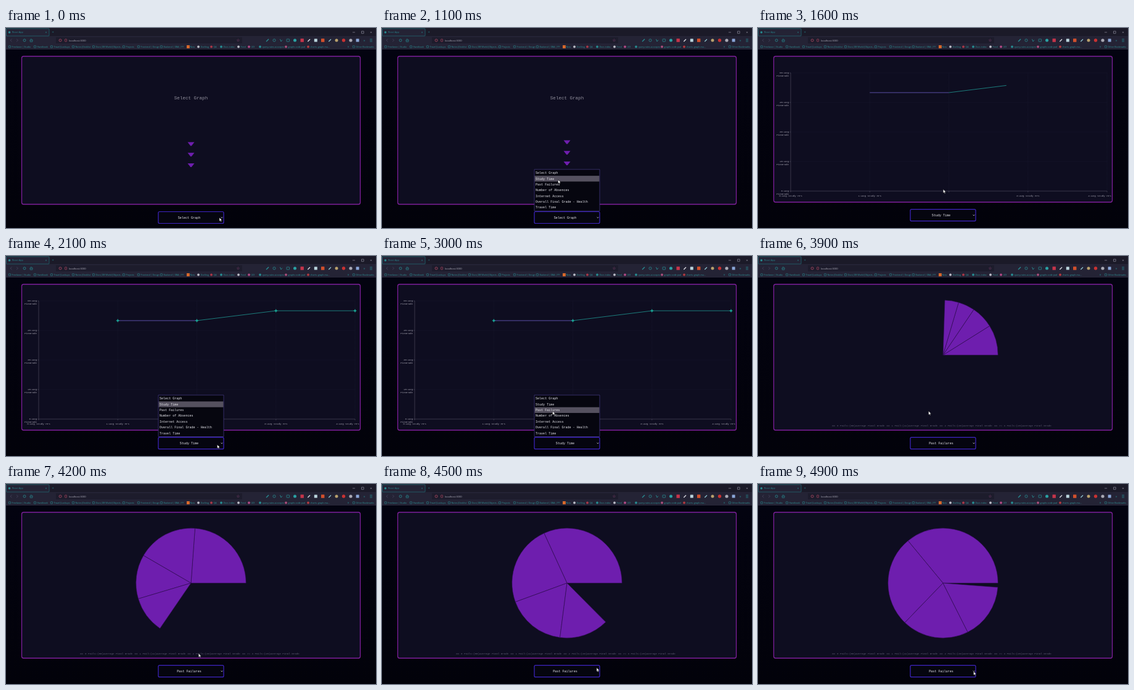
Write an HTML page with a canvas that moves like this. It is 600 px wide and 325 px high and loops after 5 s.

```html
<!DOCTYPE html>
<html lang="en">
<head>
<meta charset="utf-8">
<title>Graph selector</title>
<style>
html, body { margin: 0; width: 100%; height: 100%; overflow: hidden; background: #030310; }
canvas { display: block; width: 600px; height: 325px; }
</style>
</head>
<body>
<canvas id="stage" width="600" height="325"></canvas>
<script>
const ctx = document.getElementById('stage').getContext('2d');
const LOOP = 5000, STEP = 100;
const MONO = '"Liberation Mono", monospace', SANS = '"Open Sans", sans-serif';
const TEAL = '#27898f', PURPLE = '#6e1eae';
const OPTIONS = ['Select Graph', 'Study Time', 'Past Failures', 'Number of Absences',
  'Internet Access', 'Overall Final Grade - Health', 'Travel Time'];
const FAILS = [['0 Fails', 55], ['1 Fail', 41], ['2 Fails', 30], ['>= 3 Fails', 25]];
const GRADES = [[1, 50], [2, 50], [3, 55], [4, 55]];
// time, x, y of the pointer tip
const POINTER = [[0, 346, 308], [600, 346, 308], [1100, 285.5, 246.5], [1400, 285.5, 246.5],
  [2000, 342.5, 306.5], [2300, 342.5, 306.5], [2900, 276.5, 252], [4000, 276.5, 252],
  [4400, 348, 298.5], [4500, 348, 298.5], [4800, 349.5, 304.5], [5000, 349.5, 304.5]];
// x, icon colour (none = folder), label
const BOOKMARKS = [[4, '', 'Freelance | Studio'], [45, '', 'Handbook'], [72, '', 'Travel|Lookups'],
  [107, '', 'Notes|Decklist'], [140, '', 'Docs|DB World|Objects...'], [189, '', 'Projects'],
  [213, '', 'Frontend | Design'], [250, '', 'Backend | DBA | PF'], [293, '#d9692b', 'New'],
  [310, '#b9bcc6', 'Drafting'], [331, '#a83848', 'QA'], [347, TEAL, 'Docs index'],
  [375, '#b9bcc6', 'Feed'], [392, '#b04a86', 'UIX'], [410, TEAL, 'query-rates-ai-scopes'],
  [452, '#a8507c', 'graphs code pad'], [488, '#b03a40', 'charts: graph-mu...'],
  [562, '', 'Other Bookmarks']];

const clamp = v => Math.max(0, Math.min(1, v));
const smooth = v => v * v * (3 - 2 * v);
const mix = (a, b, k) => a + (b - a) * k;

// cubic-bezier(.25, .1, .25, 1)
function ease(x) {
  let lo = 0, hi = 1;
  const curve = (a, b, u) => 3 * (1 - u) ** 2 * u * a + 3 * (1 - u) * u * u * b + u ** 3;
  for (let i = 0; i < 24; i++) {
    const mid = (lo + hi) / 2;
    if (curve(.25, .25, mid) < x) lo = mid; else hi = mid;
  }
  return curve(.1, 1, lo);
}

function text(str, x, y, size, color, align = 'left', family = MONO) {
  ctx.font = `${size}px ${family}`;
  ctx.fillStyle = color;
  ctx.textAlign = align;
  ctx.fillText(str, x, y);
}

function rect(x, y, w, h, color) {
  ctx.fillStyle = color;
  ctx.fillRect(x, y, w, h);
}

function box(x, y, w, h, r, fill, stroke, width) {
  ctx.beginPath();
  ctx.roundRect(x, y, w, h, r);
  if (fill) { ctx.fillStyle = fill; ctx.fill(); }
  if (stroke) { ctx.strokeStyle = stroke; ctx.lineWidth = width; ctx.stroke(); }
}

function path(points, stroke, width, fill) {
  ctx.beginPath();
  points.forEach(([x, y]) => ctx.lineTo(x, y));
  if (fill) { ctx.closePath(); ctx.fillStyle = fill; ctx.fill(); }
  if (stroke) { ctx.strokeStyle = stroke; ctx.lineWidth = width; ctx.stroke(); }
}

function disc(x, y, r, fill, stroke) {
  ctx.beginPath();
  ctx.arc(x, y, r, 0, 7);
  if (fill) { ctx.fillStyle = fill; ctx.fill(); }
  if (stroke) { ctx.strokeStyle = stroke; ctx.lineWidth = .8; ctx.stroke(); }
}

function drawBrowser() {
  rect(0, 0, 600, 14, '#1b1a28');
  rect(0, 13, 600, 22, '#242335');
  rect(81, 15, 302, 10, '#1d1c2c');
  box(.5, 1, 69.5, 12, 1, '#242335', '#1f6670', .8);
  disc(5.5, 7, 1.8, TEAL);
  text('React App', 10, 8.4, 3.8, TEAL, 'left', SANS);
  text('×', 65, 8.6, 5, TEAL, 'center', SANS);
  text('+', 76, 8.8, 5.5, TEAL, 'center', SANS);
  path([[562, 7], [566, 7]], '#8d8c9c', .7);
  box(576.5, 5.2, 3.6, 3.6, 0, '', '#8d8c9c', .7);
  text('×', 592, 9, 6, '#9a99a8', 'center', SANS);

  path([[9.5, 17.8], [7, 20], [9.5, 22.2]], '#44435a', .8);
  path([[17, 17.8], [19.5, 20], [17, 22.2]], '#44435a', .8);
  disc(30, 20, 2, '', TEAL);
  path([[38.4, 20.2], [41, 17.6], [43.6, 20.2]], TEAL, .8);
  box(39.2, 20, 3.6, 2.4, 0, '', TEAL, .7);
  disc(88, 20, 2, '', '#b04a62');
  box(95.6, 18, 2.8, 4, .5, '', '#b04a62', .7);
  text('localhost:3000', 102, 21.6, 4.1, '#b0afbd', 'left', SANS);
  text('☆', 376.5, 22.3, 6.5, '#b0528c', 'center', '"DejaVu Sans", sans-serif');

  path([[422, 22], [426, 18]], TEAL, 1.4);
  disc(435, 20, 2.1, '', TEAL);
  path([[444.5, 18], [446, 22], [448, 19.5]], TEAL, .9);
  box(455, 18, 4.6, 4, .5, '', TEAL, .8);
  disc(468.5, 20, 2.5, '#2aa0a2');
  box(477.5, 17.3, 5.4, 5.4, .5, '#c5354a');
  path([[489.3, 22], [493, 18.2]], '#d8d8e0', 1.4);
  box(499.8, 17.4, 5, 5, .5, '#b9d4dc');
  box(511, 17.3, 5.4, 5.4, .5, '#d2502c');
  path([[523.3, 22], [527, 18.2]], '#8ec4cc', 1.3);
  disc(536, 20, 2.5, '#b8a06c');
  disc(547.5, 20, 2.7, '#c83232');
  disc(559, 20, 2.6, '#a9a9b4');
  box(567.6, 17.5, 5, 5, .5, '#8aa6d8');
  text('»', 581, 22, 6, TEAL, 'center', SANS);
  for (const y of [18, 20, 22]) path([[590, y], [594, y]], TEAL, .7);

  for (const [x, icon, label] of BOOKMARKS) {
    if (!icon) box(x + .3, 28.8, 3.3, 3.2, .5, '', TEAL, .65);
    else if (x === 293) rect(x, 28, 4.8, 5, icon);
    else disc(x + 2, 30.5, 1.9, icon);
    text(label, x + 5.6, 31.8, 3.55, '#2f979b', 'left', SANS);
  }
  text('»', 555, 32.2, 6, TEAL, 'center', SANS);
}

function drawPrompt(t) {
  text('Select Graph', 300, 116.4, 7.55, '#918f9c', 'center');
  const shift = t < 100 ? 0 : mix(1, -3, clamp((t - 500) / 600));
  for (let i = 0; i < 3; i++) {
    const y = 185.5 + 17.2 * i + shift;
    path([[294.5, y], [305.5, y], [300.8, y + 6], [299.2, y + 6]], '', 0, PURPLE);
  }
}

function drawLineChart(t) {
  const px = h => 53 + 128.25 * h, py = g => 265 - 3.2 * g;
  ctx.setLineDash([1, 1]);
  for (let i = 1; i <= 4; i++) {
    path([[px(i), 73], [px(i), 265]], '#1d1b33', .6);
    path([[53, py(15 * i)], [566, py(15 * i)]], '#1d1b33', .6);
  }
  ctx.setLineDash([]);
  path([[53, 73], [53, 265], [566, 265]], '#4b4a5c', .7);
  for (let i = 0; i <= 4; i++) {
    const y = py(15 * i);
    path([[51, y], [53, y]], '#4b4a5c', .7);
    path([[px(i), 265], [px(i), 267]], '#4b4a5c', .7);
    text(`${15 * i}:Avg`, 50, y + .6, 4.17, '#a3a1ae', 'right');
    text('FinGrade', 50, y + 5.6, 4.17, '#a3a1ae', 'right');
    if (i !== 2) text(`${i}:Avg Study Hrs`, Math.min(px(i), 554), 273.6, 4.17, '#a3a1ae', 'center');
  }

  const points = GRADES.map(([h, g]) => [px(h), py(g)]);
  ctx.save();
  ctx.beginPath();
  ctx.rect(181, 60, 385 * ease(clamp((t - 1400) / 600)), 205);
  ctx.clip();
  path(points.slice(0, 2), '#5b4fa6', 1);
  path(points.slice(1), '#1c7c7c', 1);
  ctx.restore();
  if (t < 2000) return;
  for (const [x, y] of points) {
    const star = Array.from({ length: 8 }, (_, i) => {
      const r = i % 2 ? 1.5 : 3, a = i * Math.PI / 4;
      return [x + r * Math.cos(a), y + r * Math.sin(a)];
    });
    path(star, '', 0, '#1aa394');
  }
}

function drawPie(t) {
  const total = FAILS.reduce((sum, [, n]) => sum + n, 0);
  const sweep = 2 * Math.PI * ease(clamp((t - 3638) / 1475));
  let angle = 0, x = 120;
  for (const [name, n] of FAILS) {
    const next = angle - sweep * n / total;
    if (sweep > .01) {
      ctx.beginPath();
      ctx.moveTo(300, 161);
      ctx.arc(300, 161, 89.2, angle, next, true);
      ctx.closePath();
      ctx.fillStyle = PURPLE;
      ctx.fill();
      ctx.strokeStyle = '#2c0d4c';
      ctx.lineWidth = .6;
      ctx.stroke();
    }
    angle = next;
    const label = `${name}:(${n})Average Final Grade`;
    path([[x, 276], [x + 5, 276]], '#5c5a70', .7);
    text(label, x + 8, 277.4, 4.17, '#5f5d74');
    x += 11 + label.length * 2.5;
  }
}

function drawSelect(top, chosen) {
  box(247, top, 106, 19, 2, '#05050f', '#3f25c4', 1.2);
  text(OPTIONS[chosen], 297, top + 11, 5.05, '#f0f0f4', 'center');
  path([[348.6, top + 8.8], [350, top + 10.2], [351.4, top + 8.8]], '#e0e0e8', .8);
}

function drawOptions(top, chosen, tipY) {
  const row = 9.35, first = top - 67.7;
  const over = Math.floor((tipY - first) / row);
  const active = over >= 0 && over < OPTIONS.length ? over : chosen;
  box(247, first - 1, 106, 67.5, 0, '#06060f', '#41367c', .8);
  rect(247.5, first + active * row, 105, row, '#55515f');
  OPTIONS.forEach((name, i) => text(name, 249, first + i * row + 6.4, 5.05, '#e8e8ee'));
}

function pointerAt(t) {
  const i = POINTER.findIndex(p => p[0] > t);
  const [t0, x0, y0] = POINTER[i - 1], [t1, x1, y1] = POINTER[i];
  const k = smooth((t - t0) / (t1 - t0));
  return [mix(x0, x1, k), mix(y0, y1, k)];
}

function drawPointer(x, y) {
  const shape = [[0, 0], [0, 6.2], [1.5, 4.9], [2.5, 7.1], [3.5, 6.6], [2.5, 4.5], [4.5, 4.4]];
  path([...shape, [0, 0]].map(([dx, dy]) => [x + dx, y + dy]), '#08080c', .5, '#fff');
}

function draw(t) {
  const chosen = t < 1400 ? 0 : t < 3200 ? 1 : 2;
  const open = (t >= 700 && t < 1400) || (t >= 2100 && t < 3200);
  const selectTop = chosen ? 294.7 : 298.5;
  const [x, y] = pointerAt(t);

  const page = ctx.createLinearGradient(0, 35, 0, 325);
  page.addColorStop(0, '#030310');
  page.addColorStop(1, '#02020a');
  rect(0, 0, 600, 325, page);
  drawBrowser();
  box(25.5, 46, 549, chosen ? 237 : 240.5, 3, '#0e0d20', '#7f1f9c', 1.3);
  [drawPrompt, drawLineChart, drawPie][chosen](t);
  drawSelect(selectTop, chosen);
  if (open) drawOptions(selectTop, chosen, y);
  drawPointer(x, y);
}

const start = performance.now();
function tick() {
  const elapsed = (performance.now() - start) % LOOP;
  draw(Math.floor(elapsed / STEP) * STEP);
  requestAnimationFrame(tick);
}
tick();
</script>
</body>
</html>
```
